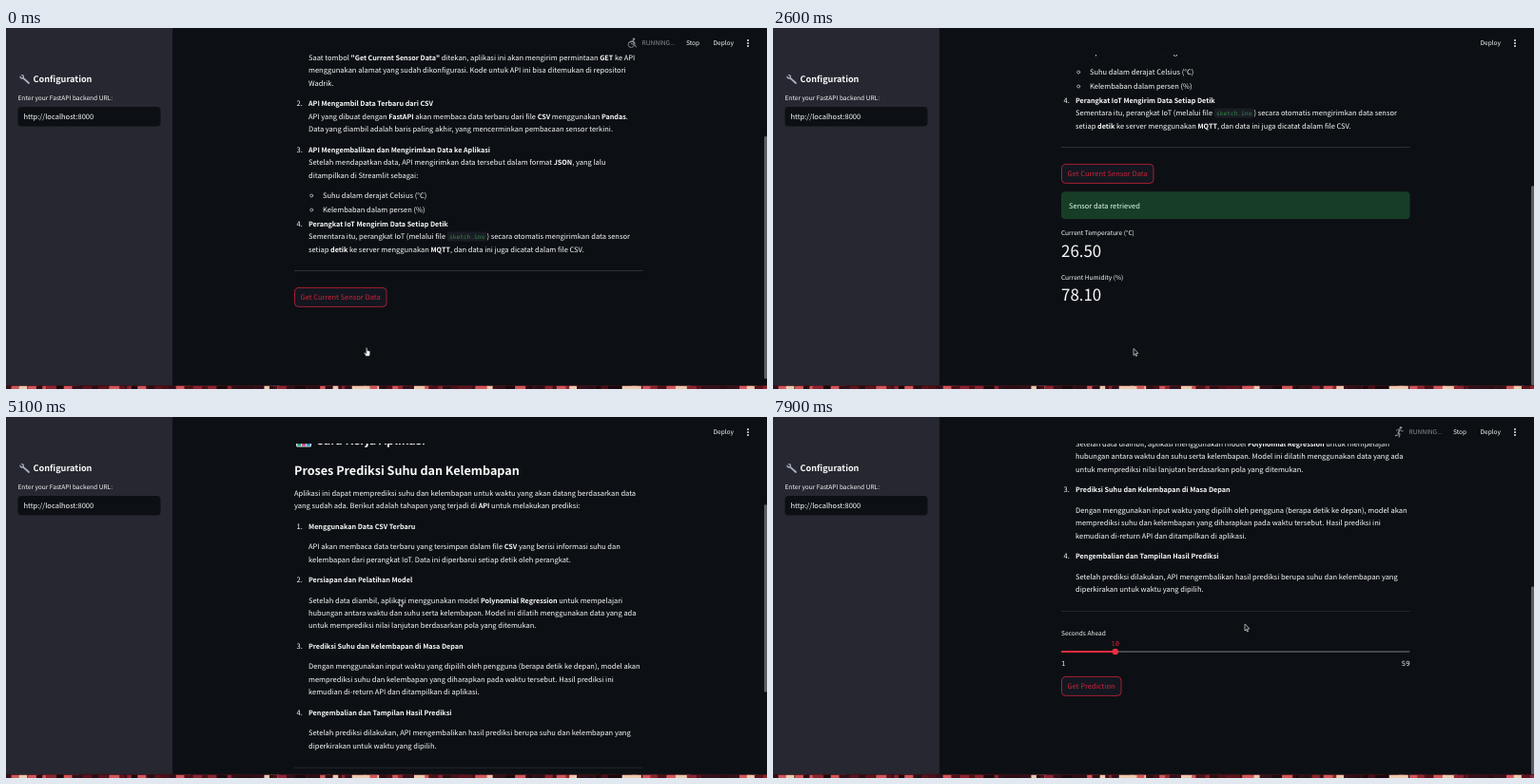
An HTML page with a canvas for the animation above (8 s loop, 800 by 380 pixels).

```html
<!DOCTYPE html>
<html lang="id">
<head>
<meta charset="utf-8">
<title>Poultry Monitor</title>
<style>
html, body { margin: 0; width: 800px; height: 380px; overflow: hidden; background: #0c1014; }
canvas { display: block; }
</style>
</head>
<body>
<canvas id="stage" width="800" height="380"></canvas>
<script>
const ctx = document.getElementById('stage').getContext('2d');
ctx.textRendering = 'geometricPrecision';
const SANS = '"Noto Sans CJK JP", "Noto Sans CJK SC", "Noto Sans CJK", "Noto Sans", sans-serif';
const MONO = '"Noto Sans Mono", "DejaVu Sans Mono", monospace';
const BODY = 8.32, SMALL = 7.28, TAB = 7.48;
const WHITE = '#fafafa', RED = '#ee2c40', HOT = '#cc2239', BG = '#0c1014', RULE = '#2c2f37';
const LOOP = 8000, VIEW = 376, HEADER = 28;

// ---- drawing helpers ----
function box(x, y, w, h, fill, r = 0, stroke) {
  ctx.beginPath();
  ctx.roundRect(x, y, w, h, r);
  if (fill) { ctx.fillStyle = fill; ctx.fill(); }
  if (stroke) { ctx.strokeStyle = stroke; ctx.lineWidth = 0.8; ctx.stroke(); }
}

function line(color, width, ...pts) {
  ctx.strokeStyle = color;
  ctx.lineWidth = width;
  ctx.lineCap = ctx.lineJoin = 'round';
  ctx.beginPath();
  for (let i = 0; i < pts.length; i += 2) ctx.lineTo(pts[i], pts[i + 1]);
  ctx.stroke();
}

function disc(x, y, r, fill, stroke, width = 0.7) {
  ctx.beginPath();
  ctx.arc(x, y, r, 0, 7);
  if (fill) { ctx.fillStyle = fill; ctx.fill(); }
  if (stroke) { ctx.strokeStyle = stroke; ctx.lineWidth = width; ctx.stroke(); }
}

// *bold* and `code` are marked inline; y is the middle of the capitals
function text(str, x, y, size = BODY, color = WHITE) {
  let bold = false, code = false;
  for (const part of str.split(/([*`])/)) {
    if (part === '*') bold = !bold;
    else if (part === '`') code = !code;
    else if (part) {
      ctx.font = code ? `${size * 0.75}px ${MONO}`
        : bold ? `700 ${size / 1.156}px ${SANS}` : `${size / 1.106}px ${SANS}`;
      const w = ctx.measureText(part).width;
      if (code) {
        box(x, y - 5, w + 4.2, 10, '#1a1c24', 2);
        x += 2.1;
      }
      ctx.fillStyle = code ? '#35894a' : color;
      ctx.fillText(part, x, y + size * 0.33);
      x += w + (code ? 2.1 : 0);
    }
  }
}

function mono(str, x, y, color, align) {
  ctx.font = `${SMALL}px ${MONO}`;
  ctx.textAlign = align;
  ctx.fillStyle = color;
  ctx.fillText(str, x, y + 2.6);
  ctx.textAlign = 'left';
}

function button(label, y, w, hot) {
  box(303.5, y, w, 20, '#131720', 4, hot ? HOT : '#3b3e46');
  text(label, 309.5, y + 10, BODY, hot ? HOT : WHITE);
}

function listItem(n, title, y) {
  text(n + '.', 305.5, y);
  text(`*${title}*`, 318, y);
}

const lines = (x, rows) => rows.forEach(([y, str]) => text(str, x, y));

// ---- icons ----
function thermometer() {
  line('#e4dfe2', 6.8, 310.5, 63.5, 323, 76);
  disc(324.5, 77.5, 5.4, '#e4dfe2');
  line('#d42a38', 4.8, 310.8, 63.8, 323, 76);
  disc(324.5, 77.5, 4.6, '#d42a38');
  line('#f3d9dc', 0.9, 311, 64, 317, 70);
  line('#c9cdd2', 1, 317.5, 62.5, 319.5, 60.5);
  line('#c9cdd2', 1, 322, 67, 324, 65);
}

function barChart(x, y, s) {
  box(x, y, s, s, '#cfe0ec', s / 10);
  const bar = (i, h, c) => box(x + s * (0.08 + i * 0.3), y + s * (0.94 - h), s * 0.24, s * h, c);
  bar(0, 0.55, '#20a36a');
  bar(1, 0.82, '#cf3f78');
  bar(2, 0.66, '#2f8fd0');
}

function trendChart(x, y, c) {
  box(x, y, 8, 8, '#d9dcea', 0.8);
  line('#a9b4cc', 0.5, x + 1, y + 4, x + 7, y + 4);
  line(c, 1, x + 1, y + 6.5, x + 3, y + 4, x + 4.6, y + 5, x + 7, y + 1.5);
}

function wrench() {
  line('#aab4bd', 1.8, 18, 52.6, 24, 58);
  ctx.beginPath();
  ctx.arc(16.7, 51.3, 1.7, -1.6, 3.2);
  ctx.strokeStyle = '#aab4bd';
  ctx.lineWidth = 1.3;
  ctx.stroke();
}

function linkIcon(x, y) {
  box(x - 4, y - 1.8, 4.6, 3.6, null, 1.8, '#8b8d94');
  box(x - 0.6, y - 1.8, 4.6, 3.6, null, 1.8, '#8b8d94');
}

function wheelRacer(t) {
  const c = '#8c8e94', lean = (t / 100) % 4 < 2 ? 0 : 0.7;
  disc(657.3, 17.3, 3.2, null, c, 0.9);
  disc(660, 11.8 + lean, 1.3, c);
  line(c, 1.3, 656, 15, 659, 13.5 + lean, 661, 16 + lean);
  line(c, 1, 657, 16.5, 661, 17.5, 662.5, 20);
}

function runner(t) {
  const c = '#8c8e94', k = Math.sin(t / 200 * Math.PI);
  disc(660, 11.2, 1.3, c);
  line(c, 1.5, 659, 13, 657.4, 16.6);
  line(c, 0.9, 655, 15 + k * 0.5, 656.6, 13.2, 659, 13.2, 660.6, 15, 662.4, 14.2 - k * 0.5);
  line(c, 1.1, 657.4, 16.6, 659.6 + k * 0.6, 18.2, 659.2 + k, 21);
  line(c, 1.1, 657.4, 16.6, 656.4 - k * 0.6, 19, 653.8 - k * 0.5, 19.6);
}

function polygon(pts, fill, stroke) {
  ctx.beginPath();
  for (let i = 0; i < pts.length; i += 2) ctx.lineTo(pts[i], pts[i + 1]);
  ctx.closePath();
  ctx.fillStyle = fill;
  ctx.fill();
  ctx.strokeStyle = stroke;
  ctx.lineWidth = 0.7;
  ctx.stroke();
}

function cursor(kind, x, y) {
  ctx.save();
  ctx.translate(x, y);
  if (kind === 'hand') {
    polygon([-1, -1, 0.4, -1, 0.6, 2, 3.4, 2.8, 3.2, 6, 2.4, 8, -1, 8, -3, 5, -2.6, 4, -1, 5], '#fff', '#222');
  } else if (kind === 'beam') {
    line('#c8c8c8', 0.8, -1.5, -3, 1.5, -3);
    line('#c8c8c8', 0.8, 0, -3, 0, 5);
    line('#c8c8c8', 0.8, -1.5, 5, 1.5, 5);
  } else {
    polygon([0, 0, 0, 7, 1.5, 5.6, 2.6, 8, 3.5, 7.6, 2.5, 5.2, 4.4, 5], '#111', '#e4e4e4');
  }
  ctx.restore();
}

// ---- motion: keys are [time, value...], eased between ----
function track(keys, t) {
  let i = keys.findIndex(k => k[0] > t);
  if (i < 0) return keys.at(-1).slice(1);
  if (i === 0) return keys[0].slice(1);
  const a = keys[i - 1], b = keys[i];
  const u = (t - a[0]) / (b[0] - a[0]), e = u * u * (3 - 2 * u);
  return a.slice(1).map((v, j) => v + (b[j + 1] - v) * e);
}

const SCROLL = [[1800, 168], [2400, 298], [2700, 298], [3400, 0], [4500, 0], [4700, 11], [5500, 340]];
const POINTER = [[0, 379.5, 337.5], [3200, 379, 337.5], [3500, 379, 329], [3700, 379, 329], [4100, 463, 124],
  [4300, 463, 124], [4600, 416, 190], [4800, 416, 190], [5300, 412, 193], [5800, 412, 193],
  [6600, 342, 283], [7100, 342, 283], [7500, 496, 218]];
const DONE = 1700, SWITCH = 4200, PREDICT = 6900;

// ---- page parts ----
function pageTop(t) {
  const forecast = t >= SWITCH;
  thermometer();
  text('*AI-Powered Poultry Monitor*', 339, 71.5, 23.9);
  text('Prototype to test temperature/humidity forecasting and FAQ system', 303, 100);
  text('Intro dulu', 303, 125.5, TAB);
  trendChart(344, 121.5, '#8257c0');
  text('Get Current Sensor Data', 354.5, 125.5, TAB, forecast ? WHITE : RED);
  trendChart(440.5, 121.5, '#3a8fd0');
  text('Forecast', 451, 125.5, TAB, forecast || t >= 4100 ? RED : WHITE);
  text('*?*', 489, 125.5, 9.5, RED);
  text('RAG Sentence Transformer + Trelvo', 498, 125.5, TAB);
  box(303, 136, 366.5, 0.8, RULE);
  const [x, w] = track([[SWITCH, 343.5, 87.5], [SWITCH + 300, 440, 38]], t);
  box(x, 135.3, w, 1.3, RED);
}

function sensorTab(t) {
  barChart(305, 153, 16);
  text('*Cara Kerja Aplikasi*', 325.5, 161, 14.56);
  listItem(1, 'Menggunakan Metode GET ke API', 186);
  listItem(2, 'API Mengambil Data Terbaru dari CSV', 247);
  listItem(3, 'API Mengembalikan dan Mengirimkan Data ke Aplikasi', 296);
  listItem(4, 'Perangkat IoT Mengirim Data Setiap Detik', 374);
  lines(318, [
    [199, 'Saat tombol *"Get Current Sensor Data"* ditekan, aplikasi ini akan mengirim permintaan *GET* ke API'],
    [212.5, 'menggunakan alamat yang sudah dikonfigurasi. Kode untuk API ini bisa ditemukan di repositori'],
    [226, 'Wadrik.'],
    [261, 'API yang dibuat dengan *FastAPI* akan membaca data terbaru dari file *CSV* menggunakan *Pandas*.'],
    [274, 'Data yang diambil adalah baris paling akhir, yang mencerminkan pembacaan sensor terkini.'],
    [309.5, 'Setelah mendapatkan data, API mengirimkan data tersebut dalam format *JSON*, yang lalu'],
    [322.8, 'ditampilkan di Streamlit sebagai:'],
    [387.5, 'Sementara itu, perangkat IoT (melalui file `sketch.ino`) secara otomatis mengirimkan data sensor'],
    [401, 'setiap *detik* ke server menggunakan *MQTT*, dan data ini juga dicatat dalam file CSV.']
  ]);
  lines(333, [[344, 'Suhu dalam derajat Celsius (°C)'], [359, 'Kelembaban dalam persen (%)']]);
  disc(321.2, 344.5, 1.5, null, WHITE, 0.6);
  disc(321.2, 359.5, 1.5, null, WHITE, 0.6);
  box(303, 423.1, 366.5, 0.8, RULE);
  button('Get Current Sensor Data', 441.4, 96.5, true);
  if (t < DONE) return;
  box(303, 470.3, 366.5, 28.7, '#173d27', 4);
  text('Sensor data retrieved', 311, 485, BODY, '#dffde9');
  text('Current Temperature (°C)', 303, 514, SMALL);
  text('26.50', 303, 533, 18.72);
  text('Current Humidity (%)', 303, 560.3, SMALL);
  text('78.10', 303, 579, 18.72);
}

function forecastTab(t) {
  text('*Predict Future Temperature & Humidity*', 303, 165.5, 18.72);
  barChart(305, 191, 16);
  text('*Cara Kerja Aplikasi*', 325.5, 199.5, 14.56);
  if (t >= 4500 && t < 4900) linkIcon(448.5, 200);
  text('*Proses Prediksi Suhu dan Kelembapan*', 303, 231.5, 14.56);
  lines(303, [
    [255.3, 'Aplikasi ini dapat memprediksi suhu dan kelembapan untuk waktu yang akan datang berdasarkan data'],
    [268.7, 'yang sudah ada. Berikut adalah tahapan yang terjadi di *API* untuk melakukan prediksi:']
  ]);
  listItem(1, 'Menggunakan Data CSV Terbaru', 290.5);
  listItem(2, 'Persiapan dan Pelatihan Model', 347);
  listItem(3, 'Prediksi Suhu dan Kelembapan di Masa Depan', 416.5);
  listItem(4, 'Pengembalian dan Tampilan Hasil Prediksi', 486.3);
  lines(318, [
    [312, 'API akan membaca data terbaru yang tersimpan dalam file *CSV* yang berisi informasi suhu dan'],
    [325.5, 'kelembapan dari perangkat IoT. Data ini diperbarui setiap detik oleh perangkat.'],
    [368.5, 'Setelah data diambil, aplikasi menggunakan model *Polynomial Regression* untuk mempelajari'],
    [381.7, 'hubungan antara waktu dan suhu serta kelembapan. Model ini dilatih menggunakan data yang ada'],
    [395, 'untuk memprediksi nilai lanjutan berdasarkan pola yang ditemukan.'],
    [438.2, 'Dengan menggunakan input waktu yang dipilih oleh pengguna (berapa detik ke depan), model akan'],
    [451.7, 'memprediksi suhu dan kelembapan yang diharapkan pada waktu tersebut. Hasil prediksi ini'],
    [465, 'kemudian di-return API dan ditampilkan di aplikasi.'],
    [508.2, 'Setelah prediksi dilakukan, API mengembalikan hasil prediksi berupa suhu dan kelembapan yang'],
    [521.7, 'diperkirakan untuk waktu yang dipilih.']
  ]);
  box(303, 544.2, 366.5, 0.8, RULE);
  text('Seconds Ahead', 303, 568, SMALL);
  mono('10', 359.8, 578, HOT, 'center');
  box(303, 586, 366.5, 2, '#45474d', 1);
  box(303, 586, 57, 2, RED, 1);
  disc(359.8, 587, 3.2, RED);
  mono('1', 303, 599, WHITE, 'left');
  mono('59', 669.5, 599, WHITE, 'right');
  button('Get Prediction', 613.4, 62.5, t >= 6500);
}

function sidebar() {
  box(0, 0, 175, VIEW, '#262730');
  wrench();
  text('*Configuration*', 28.5, 54, 10.55);
  text('Enter your FastAPI backend URL:', 12.5, 74, SMALL);
  box(12.5, 83, 150, 20.5, BG, 4);
  text('http://localhost:8000', 18.5, 93.3);
}

function header(t) {
  box(175, 0, 625, HEADER, BG);
  text('Deploy', 743.5, 16, SMALL);
  for (const y of [13, 16, 19]) disc(780, y, 0.9, WHITE);
  if (t >= DONE && t < PREDICT) return;
  (t < DONE ? wheelRacer : runner)(t);
  text('RUNNING...', 668.5, 16, SMALL, '#8c8e94');
  text('Stop', 715, 16, SMALL);
}

// sliver of desktop below the window
function wallpaper() {
  let seed = 7;
  const rnd = () => (seed = seed * 16807 % 2147483647) / 2147483647;
  const tones = ['#1a080c', '#2a0d14', '#5a141d', '#8a2430', '#4a1018', '#d0565a', '#ecc9ae', '#30101a'];
  box(0, VIEW, 800, 4, '#3a1018');
  for (let x = 0; x < 800; x += 3 + rnd() * 9) {
    box(x, 376.8, 5 + rnd() * 12, 4, tones[Math.floor(rnd() * tones.length)]);
  }
}

function draw(t) {
  const forecast = t >= SWITCH;
  const [scroll] = track(SCROLL, t);
  const height = forecast ? 716 : t < 300 ? 554 : t < DONE ? 582 : 674;
  box(0, 0, 800, 380, BG);
  ctx.save();
  ctx.translate(0, -scroll);
  pageTop(t);
  (forecast ? forecastTab : sensorTab)(t);
  ctx.restore();
  box(797, scroll * VIEW / height, 3, VIEW * VIEW / height, '#5b5d63', 1);
  header(t);
  sidebar();
  wallpaper();
  const [x, y] = track(POINTER, t);
  const onTarget = t < 300 || (t >= 4100 && t < 4400) || (t >= 6500 && t < 7200);
  cursor(onTarget ? 'hand' : t >= 4500 && t < 4900 ? 'beam' : 'arrow', x, y);
}

const start = performance.now();
function tick() {
  const t = (performance.now() - start) % LOOP;
  draw(Math.floor(t / 100) * 100);
  requestAnimationFrame(tick);
}
tick();
</script>
</body>
</html>
```
